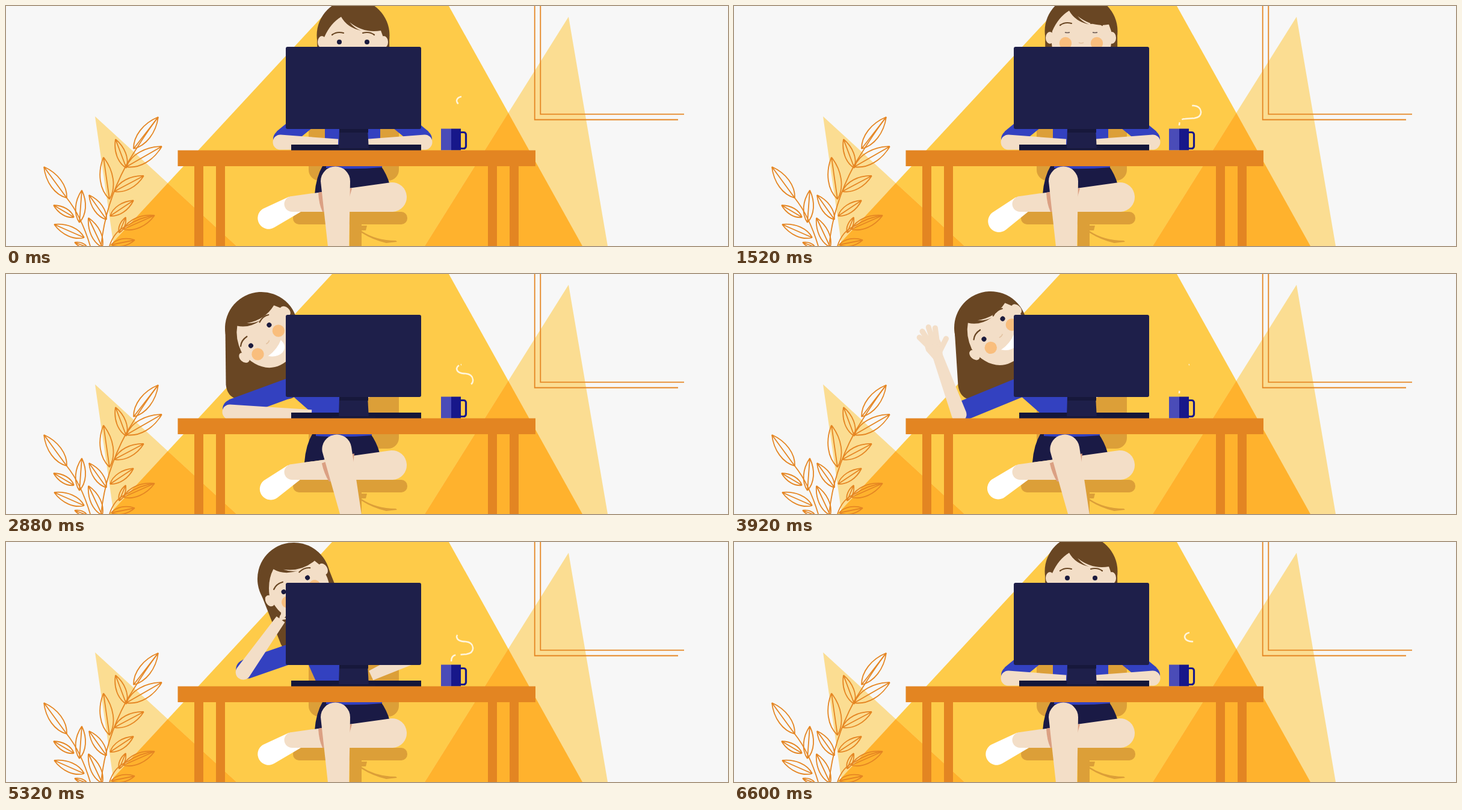
An HTML page that plays this animation: 1200 px wide and 400 px high, repeating every 6.64 s.

```html
<!DOCTYPE html>
<html lang="en">
<head>
<meta charset="utf-8">
<title>Desk wave</title>
<style>
html, body { margin: 0; width: 100%; height: 100%; overflow: hidden; background: #f7f7f7; }
svg { display: block; width: 100%; height: 100%; }
.line { fill: none; stroke: #e58623; stroke-width: 1.8; }
.skin { fill: #f3dec7; }
.hair { fill: #694623; }
.blue { fill: #3341c0; }
.sleeve { stroke: #3341c0; stroke-width: 33; }
.chair { fill: #dc9f38; }
.desk { fill: #e38522; }
.steam { fill: none; stroke: #fff5dc; stroke-width: 2.5; }
.brow { fill: none; stroke: #694623; stroke-width: 2.2; stroke-linecap: round; }
</style>
</head>
<body>
<svg viewBox="0 0 1200 400">
  <defs>
    <clipPath id="big"><path d="M542,0H736L958,400H172Z"/></clipPath>
    <path id="sides" d="M148,184L383,400H179ZM935,18L1000,400H696Z"/>
    <path id="plume" pathLength="95" d="M740,199Q740,188 750,188L765,187Q777,185 776,176Q775,167 764,166Q750,166 749,158Q750,152 757,151"/>
  </defs>

  <path fill="#fecb49" d="M542,0H736L958,400H172Z"/>
  <use href="#sides" fill="#fbdd92"/>
  <use href="#sides" fill="#ffb22d" clip-path="url(#big)"/>
  <path class="line" d="M878.700,0V189.500H1117M888.300,0V180.300H1127"/>
  <g id="plant" class="line">
    <path d="M158,400Q165,330 200,265Q230,215 253,185M140,400Q125,350 101,320M172,400Q180,375 200,367Q222,352 247,349"/>
  </g>

  <g class="chair">
    <rect x="503" y="120" width="150" height="171" rx="18"/>
    <rect x="477" y="343" width="190" height="21" rx="10"/>
    <path d="M571,360H591V366H600L598,374H591V400H571Z"/>
    <path d="M591,375Q615,391 648,391L650,393L632,395Q610,390 591,378Z"/>
  </g>

  <g id="skirt">
    <path fill="#1a1a45" d="M513,314Q515,285 527,265H622Q633,280 638,298L573,306Z"/>
    <path class="blue" d="M532,265H625V269Q580,273 532,270Z"/>
  </g>
  <path id="foot" fill="#fff" d="M470,318L427,338A18,18 0 0 0 446,369L490,343Z"/>
  <path class="skin" d="M475,317L640,294A24.5,24.5 0 0 1 643,343H476A13,13 0 0 1 475,317Z"/>
  <g id="leg">
    <path fill="#dba083" d="M519,311L528,309L530,343H526Q520,330 519,311ZM570,304H575L571,318Z"/>
    <path class="skin" d="M523,292A24.5,24.5 0 0 1 572,292L570,410H536Z"/>
  </g>

  <path id="mane" class="hair" d="M-60,0H60L61,98Q60,118 42,118H-40Q-57,114 -59,94Z"/>
  <path id="torso" class="blue"/>
  <line id="upperR" class="sleeve"/>
  <circle id="elbowR" class="blue"/>
  <path id="foreR" class="skin"/>

  <g id="head">
    <circle class="hair" r="60.500"/>
    <g id="ears" class="skin">
      <ellipse cx="-52" cy="11" rx="7" ry="10"/>
      <ellipse cx="51" cy="11" rx="7" ry="10"/>
    </g>
    <path id="face" class="skin" d="M-20,-31Q-38,-20 -48,3C-54,40 -38,70 0,70C38,70 54,40 50,3L46,-8Q18,-3 -6,-22Q2,-12 13,-8Q-10,-13 -20,-31Z"/>
    <g id="features">
      <circle cx="-26" cy="18" r="10.2" fill="#f9be7d"/>
      <circle cx="26" cy="18" r="10.2" fill="#f9be7d"/>
      <path class="brow" d="M-35,-12Q-27,-18 -16,-15M35,-12Q27,-18 16,-15"/>
      <path fill="none" stroke="#e3c2a0" stroke-width="1.5" d="M-4,17Q0,19 4,17"/>
      <path fill="#fff" d="M-17,33Q2,37 17,31Q17,46 3,47Q-9,46 -17,33Z"/>
      <g id="open" fill="#1b1b3e"><circle cx="-23" r="4"/><circle cx="23" r="4"/></g>
      <path id="shut" fill="none" stroke="#6b5a55" stroke-width="1.4" d="M-27,0Q-23,1 -19,0M19,0Q23,1 27,0"/>
    </g>
  </g>

  <line id="upperL" class="sleeve"/>
  <circle id="elbowL" class="blue"/>
  <path id="foreL" class="skin"/>
  <g id="hand" stroke="#f3dec7" stroke-width="9" stroke-linecap="round">
    <path class="skin" stroke="none" d="M-4,-8L14,-15Q32,-16 32,0Q32,13 18,13L-4,8Z"/>
    <path fill="none" d="M20,-9L39,-18M24,-5L47,-10M24,1L50,2M22,7L45,12M5,5L22,23"/>
  </g>

  <rect x="474" y="231" width="216" height="10" fill="#14163a"/>
  <path fill="#1e1f4a" d="M554,204H601L603,240H553Z"/>
  <path fill="#17183b" d="M554,204H602V211H554ZM541,237H614V241H541Z"/>
  <rect x="465" y="68" width="225" height="137" rx="3" fill="#1e1f4a"/>

  <use id="steamA" class="steam" href="#plume"/>
  <use id="steamB" class="steam" href="#plume"/>
  <rect x="723" y="204.500" width="17" height="36" fill="#4a4cb8"/>
  <rect x="740" y="204.500" width="16" height="36" fill="#17178a"/>
  <rect x="753" y="210.500" width="11.500" height="27" rx="4" fill="none" stroke="#17178a" stroke-width="3.200"/>
  <path class="desk" d="M285.500,240.500H880V267H852V400H837V267H816V400H801V267H364V400H349V267H328V400H313V267H285.500Z"/>
</svg>
<script>
const LOOP = 6640;
const el = {};
document.querySelectorAll('[id]').forEach(n => el[n.id] = n);
const set = (node, attrs) => { for (const k in attrs) node.setAttribute(k, attrs[k]); };

// Leaves as base and tip
const leaves = [
  [212, 238, 253, 185], [200, 268, 259, 234], [200, 270, 182, 222], [180, 309, 229, 283],
  [172, 322, 162, 252], [101, 320, 63, 268], [122, 361, 126, 307], [167, 356, 138, 315],
  [173, 350, 212, 324], [113, 352, 79, 332], [130, 386, 80, 364], [160, 402, 137, 353],
  [188, 378, 199, 352], [195, 372, 247, 349], [175, 398, 214, 390], [135, 402, 114, 394]
];
for (const [x, y, u, v] of leaves) {
  const dx = u - x, dy = v - y;
  const at = (along, side) => `${x + dx * along - dy * side},${y + dy * along + dx * side}`;
  const d = [-1, 1].map(s => `M${x},${y}C${at(.25, .2 * s)} ${at(.65, .2 * s)} ${u},${v}`).join('');
  const leaf = document.createElementNS('http://www.w3.org/2000/svg', 'path');
  set(leaf, { d: `${d}M${x},${y}L${u},${v}` });
  el.plant.append(leaf);
}

const ease = {
  in: k => k * k,
  out: k => 1 - (1 - k) ** 2,
  both: k => (1 - Math.cos(Math.PI * k)) / 2,
  linear: k => k
};
const mix = (a, b, k) => typeof a === 'number' ? a + (b - a) * k
  : Array.isArray(a) ? a.map((v, i) => mix(v, b[i], k))
  : Object.fromEntries(Object.keys(a).map(key => [key, mix(a[key], b[key], k)]));

// Keys are [time, value, easing towards this key]
function track(keys, t) {
  const i = keys.findIndex(key => key[0] > t);
  if (i < 0) return keys[keys.length - 1][1];
  if (i === 0) return keys[0][1];
  const [t0, a] = keys[i - 1], [t1, b, curve = 'both'] = keys[i];
  return mix(a, b, ease[curve]((t - t0) / (t1 - t0)));
}

// head: x, y, turn; eyes: offset in the head; fore and right: elbow, angle, length
const rest = {
  head: [577, 49, 0], eyes: [0, 11], mane: 0, shoulder: [505, 185], elbow: [460, 222],
  fore: [2, 96], cap: 16, hand: 0, torso: [530, 530, 622, 622], right: [692, 222, 178, 96]
};
const up = { ...rest, head: [577, 42, 0], eyes: [0, 2] };
const lean = {
  head: [472, 59.5, -26], eyes: [-8, 4.8], mane: 0, shoulder: [485, 173], elbow: [381.5, 200.5],
  fore: [10, 122], cap: 15, hand: 0, torso: [488, 520, 575, 600], right: [661, 185, 156, 72]
};
const peek = {
  head: [424.5, 90.5, -48.6], eyes: [-10.3, 6], mane: 0, shoulder: [485, 185], elbow: [376, 225],
  fore: [2, 136], cap: 16, hand: 0, torso: [476, 519, 575, 600], right: [605, 185, 150, 30]
};
const wave = {
  ...peek, head: [426.5, 89.5, -47.6], eyes: [1.5, 4.7], mane: -3, elbow: [378, 229],
  fore: [-110, 104], cap: 5, hand: 1
};
const back = {
  head: [478, 61.5, -31], eyes: [-2.6, 10], mane: -21, shoulder: [485, 182], elbow: [398, 212],
  fore: [-55, 108], cap: 16, hand: .3, torso: [502, 519, 575, 600], right: [668, 187, 155, 72]
};
const body = [
  [0, rest], [150, rest], [1300, up], [1850, up], [2360, lean, 'in'], [2720, peek, 'out'],
  [3380, peek], [3800, wave], [4860, wave], [5320, back, 'in'], [5800, rest, 'out'], [LOOP, rest]
];
const legKeys = [[0, 0], [1900, 0], [2300, 1], [4880, 1], [5270, 0]];
const footKeys = [
  [0, 0], [440, 1], [900, 0], [1340, 1], [2360, 1], [2880, .9], [3920, .7, 'linear'],
  [4700, .5, 'linear'], [5320, 0], [5980, 1], [LOOP, 0]
];
// Visible stretch of the plume, tail and tip
const plume = [
  [550, [0, 0]], [600, [0, 4], 'linear'], [1520, [11, 68], 'linear'], [2000, [22, 87], 'linear'],
  [2360, [75, 95], 'linear'], [2880, [94, 95], 'linear'], [3000, [95, 95], 'linear']
];
const plumeLate = [
  [1400, [0, 0]], [1520, [0, 5], 'linear'], [2000, [0, 14], 'linear'], [2360, [7, 55], 'linear'],
  [2880, [40, 91], 'linear'], [3280, [66, 95], 'linear'], [3320, [78, 95], 'linear'],
  [3920, [94, 95], 'out'], [4000, [95, 95]]
];

function arm(side, [sx, sy], [x, y], angle, length, cap, shift) {
  set(el['upper' + side], { x1: sx, y1: sy, x2: x, y2: y });
  set(el['elbow' + side], { cx: x, cy: y, r: cap });
  set(el['fore' + side], {
    transform: `translate(${x + shift},${y + 5}) rotate(${angle})`,
    d: `M0,-12.500A12.500,12.500 0 0 0 0,12.500L${length},8.500V-8.500Z`
  });
}

function showSteam(node, [tail, tip]) {
  set(node, {
    'stroke-dasharray': `0 ${tail} ${tip - tail} 200`,
    visibility: tip - tail > .1 ? 'visible' : 'hidden'
  });
}

function draw(t) {
  const p = track(body, t);
  const [hx, hy, turn] = p.head, [ex, ey] = p.eyes;
  set(el.mane, { transform: `translate(${hx},${hy}) rotate(${p.mane})` });
  set(el.head, { transform: `translate(${hx},${hy}) rotate(${turn})` });
  set(el.ears, { transform: `translate(${ex * .35})` });
  set(el.face, { transform: `translate(${ex * .35},${(ey - 11) * .35})` });
  set(el.features, { transform: `translate(${ex},${ey})` });
  const blink = t >= 1440 && t < 1600;
  set(el.open, { visibility: blink ? 'hidden' : 'visible' });
  set(el.shut, { visibility: blink ? 'visible' : 'hidden' });

  const [tl, bl, tr, br] = p.torso;
  set(el.torso, { d: `M${tl},203L${bl},241H${br}L${tr},203Z` });
  const [rx, ry, rightAngle, rightLength] = p.right;
  arm('R', [rx - 45, ry - 37], [rx, ry], rightAngle, rightLength, 16, 4);

  const swing = t > 3440 && t < 4880 ? 7 - 7 * Math.cos(2 * Math.PI * (t - 3920) / 480) : 0;
  const angle = p.fore[0] + swing * p.hand, length = p.fore[1];
  arm('L', p.shoulder, p.elbow, angle, length, p.cap, -4);
  set(el.hand, {
    transform: `translate(${p.elbow[0] - 4},${p.elbow[1] + 5}) rotate(${angle}) translate(${length}) scale(${p.hand})`
  });

  const leg = track(legKeys, t);
  set(el.skirt, { transform: `translate(${-17 * leg})` });
  set(el.leg, { transform: `translate(${2 * leg}) rotate(${-9.5 * leg},548,290)` });
  set(el.foot, { transform: `rotate(${-8.5 * track(footKeys, t)},474,330)` });

  const phase = t % (LOOP / 2);
  showSteam(el.steamA, track(plume, phase));
  showSteam(el.steamB, track(plumeLate, phase < 700 ? phase + LOOP / 2 : phase));
}

const start = performance.now();
function tick() {
  draw((performance.now() - start) % LOOP);
  requestAnimationFrame(tick);
}
tick();
</script>
</body>
</html>
```
